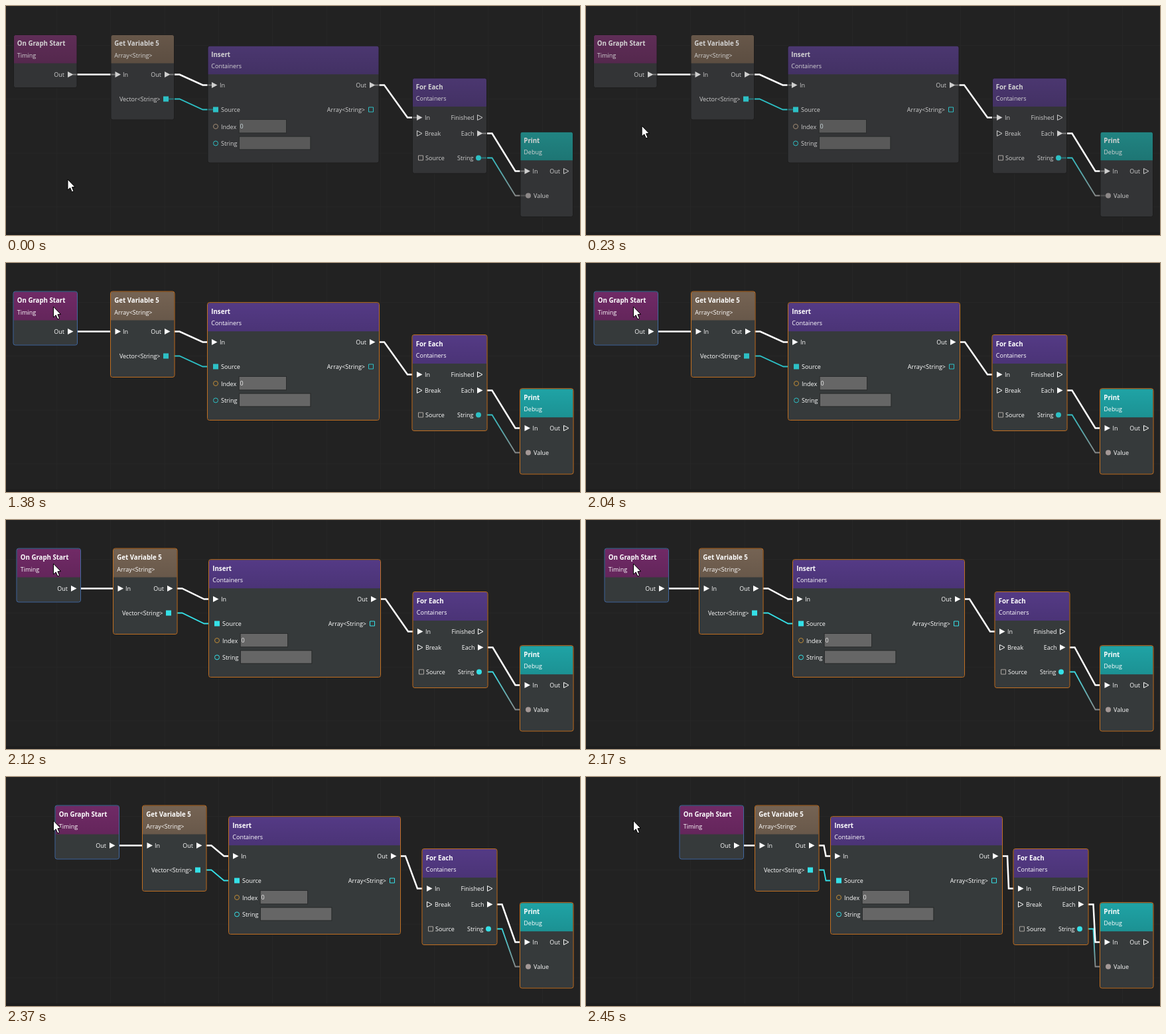
An HTML page with a canvas for the animation above (3.71 s loop, 865 px wide and 346 px high).

```html
<!DOCTYPE html>
<html lang="en">
<head>
<meta charset="utf-8">
<title>Node graph</title>
<style>
html, body { margin: 0; width: 100%; height: 100%; overflow: hidden; background: #222; }
canvas { display: block; }
</style>
</head>
<body>
<canvas id="stage" width="865" height="346"></canvas>
<script>
const ctx = document.getElementById('stage').getContext('2d');
const LOOP = 3710, HOVER_END = 430, SELECT_AT = 1380, DRAG_START = 2040;
const POINTER_STEPS = [0, 40, 90, 140, 190, 240, 280, 330, 380, 430];
const DRAG_STEPS = [0, 50, 90, 130, 180, 230, 280, 330, 360, 410];
const REGULAR = '9px "Open Sans", sans-serif';
const BOLD = 'bold 9.7px "Open Sans", sans-serif';
const GREY = '#8d8888';
const PURPLE = ['#4b3770', '#543a85'];

// Header colours are [dim, lit]; pull is the share of the drag each node follows.
// Ports: side, shape, x, y, label, label x, filled, [dim, lit] tint
const nodes = [
  { title: 'On Graph Start', sub: 'Timing', x: 11.5, y: 43.5, w: 95.5, h: 80, pull: 1,
    head: ['#5f2d57', '#702a66'], ports: [
      ['out', 'tri', 93, 103.5, 'Out', 88, true]] },
  { title: 'Get Variable 5', sub: 'Array<String>', x: 158, y: 43.5, w: 95.5, h: 128.5, pull: .75,
    head: ['#675749', '#756353'], ports: [
      ['in', 'tri', 164.5, 103.5, 'In', 176, true],
      ['out', 'tri', 239, 103.5, 'Out', 234, true],
      ['out', 'square', 237, 140.5, 'Vector<String>', 232.5, true]] },
  { title: 'Insert', sub: 'Containers', x: 304, y: 60.2, w: 258, h: 176.8, pull: .5,
    head: PURPLE, ports: [
      ['in', 'tri', 310, 119.5, 'In', 322, true],
      ['out', 'tri', 548, 119.5, 'Out', 543, true],
      ['in', 'square', 312, 156.5, 'Source', 324, true],
      ['out', 'square', 546, 156.5, 'Array<String>', 541, false],
      ['in', 'circle', 312, 182, 'Index', 324, false, ['#a58d74', '#c08c36']],
      ['in', 'circle', 312, 207.5, 'String', 324, false]],
    fields: [[351.5, 172, 70.5, 19.5, '0'], [352, 197.5, 106.5, 19, '']] },
  { title: 'For Each', sub: 'Containers', x: 612.5, y: 109, w: 112, h: 144, pull: .245,
    head: PURPLE, ports: [
      ['in', 'tri', 619, 168.5, 'In', 631, true],
      ['out', 'tri', 710, 168.5, 'Finished', 705.5, false],
      ['in', 'tri', 619, 192.5, 'Break', 631, false],
      ['out', 'tri', 710, 192.5, 'Each', 705.5, true],
      ['in', 'square', 621, 229.5, 'Source', 632, false, ['#aaa5a0', '#aaa5a0']],
      ['out', 'circle', 708, 229.5, 'String', 704.5, true]] },
  { title: 'Print', sub: 'Debug', x: 775, y: 190.2, w: 79.5, h: 128.3, pull: 0,
    head: ['#218482', '#1fa3a5'], ports: [
      ['in', 'tri', 781.5, 249.5, 'In', 793.5, true],
      ['out', 'tri', 840, 249.5, 'Out', 835, false],
      ['in', 'circle', 783, 286.5, 'Value', 795, true, [GREY, '#a39896']]] }
];

// from node, y, to node, y, kind
const wires = [
  [1, 140.5, 2, 156.5, 'data'], [3, 229.5, 4, 286.5, 'fade'],
  [0, 103.5, 1, 103.5, 'flow'], [1, 103.5, 2, 119.5, 'flow'],
  [2, 119.5, 3, 168.5, 'flow'], [3, 192.5, 4, 249.5, 'flow']
];

const held = (steps, t) => steps.filter(s => s <= t).pop();

function path(points, close) {
  ctx.beginPath();
  points.forEach(([x, y]) => ctx.lineTo(x, y));
  if (close) ctx.closePath();
}

function text(str, x, y, font, color, align = 'left') {
  ctx.font = font;
  ctx.fillStyle = color;
  ctx.textAlign = align;
  ctx.fillText(str, x, y);
}

// Circular ease-in whose clock runs a little faster at the start
function dragOffset(t) {
  if (t < DRAG_START) return 0;
  const s = held(DRAG_STEPS, t - DRAG_START);
  const p = s < 130 ? .159 + s * .0026 : .497 + (s - 130) * .001817;
  return 130 * (1 - Math.sqrt(1 - Math.min(p, 1) ** 2));
}

function pointerAt(t) {
  const p = held(POINTER_STEPS, t) / HOVER_END;
  const e = p * p * (3 - 2 * p);
  return [93 - 21.5 * e, 262 - 196 * e];
}

function drawGrid() {
  ctx.fillStyle = '#222222';
  ctx.fillRect(0, 0, 865, 346);
  ctx.fillStyle = '#262626';
  for (let x = 76; x < 865; x += 81.3) ctx.fillRect(Math.round(x), 0, 1, 346);
  for (let y = 59; y < 346; y += 81.3) ctx.fillRect(0, Math.round(y), 865, 1);
  ctx.fillStyle = '#1e1e1e';
  ctx.fillRect(0, 342, 865, 4);
}

function drawWire([from, y1, to, y2, kind], shift, teal) {
  const a = nodes[from], b = nodes[to];
  const x1 = a.x + a.w + shift(a), x2 = b.x + shift(b);
  if (kind === 'fade') {
    const g = ctx.createLinearGradient(x1, y1, x2, y2);
    g.addColorStop(0, teal);
    g.addColorStop(1, GREY);
    ctx.strokeStyle = g;
  } else ctx.strokeStyle = kind === 'flow' ? '#fff' : teal;
  ctx.lineWidth = kind === 'flow' ? 2.5 : 1.8;
  path(y1 === y2 ? [[x1, y1], [x2, y2]]
    : [[x1, y1], [x1 + 8, y1], [x2 - 7.5, y2], [x2, y2]]);
  ctx.stroke();
}

function drawPort([side, shape, x, y, label, labelX, filled, tint], node, lit, teal) {
  const ink = lit ? '#fff' : '#cfcfcf';
  const color = shape === 'tri' ? ink : tint ? tint[+lit] : teal;
  if (filled && !lit) {
    ctx.fillStyle = shape === 'tri' ? '#777' : color === GREY ? '#555' : '#287377';
    const [l, r] = side === 'in' ? [node.x, x] : [x + 8, node.x + node.w];
    ctx.fillRect(l, y - 1, r - l, 2);
  }
  ctx.fillStyle = ctx.strokeStyle = color;
  ctx.lineWidth = 1;
  const inset = filled ? 0 : .5;
  if (shape === 'tri') path([[x + inset, y - 4.5 + inset], [x + 8.5 - inset, y], [x + inset, y + 4.5 - inset]], true);
  else {
    ctx.beginPath();
    if (shape === 'square') ctx.rect(x + inset, y - 4 + inset, 8 - 2 * inset, 8 - 2 * inset);
    else ctx.arc(x + 4, y, 4 - inset, 0, 7);
  }
  filled ? ctx.fill() : ctx.stroke();
  text(label, labelX, y + 3.5, REGULAR, ink, side === 'in' ? 'left' : 'right');
}

function drawNode(node, shift, lit, border, teal) {
  const { x, y, w, h } = node;
  const ink = lit ? '#fff' : '#d4d4d4';
  ctx.save();
  ctx.translate(shift(node), 0);
  ctx.save();
  ctx.beginPath();
  ctx.roundRect(x, y, w, h, 3);
  ctx.fillStyle = lit ? '#363a3b' : '#333436';
  ctx.fill();
  ctx.clip();
  ctx.fillStyle = node.head[+lit];
  ctx.fillRect(x, y, w, 43);
  const shade = ctx.createLinearGradient(0, y, 0, y + 43);
  shade.addColorStop(0, '#00000000');
  shade.addColorStop(1, '#0000001c');
  ctx.fillStyle = shade;
  ctx.fillRect(x, y, w, 43);
  ctx.restore();

  text(node.title, x + 5.3, y + 16.5, BOLD, ink);
  text(node.sub, x + 5.3, y + 34, REGULAR, ink);
  node.ports.forEach(port => drawPort(port, node, lit, teal));
  for (const [fx, fy, fw, fh, value] of node.fields || []) {
    ctx.fillStyle = lit ? '#666666' : '#595959';
    ctx.fillRect(fx, fy, fw, fh);
    ctx.strokeStyle = '#2b2c2d';
    ctx.lineWidth = 1;
    ctx.strokeRect(fx - .5, fy - .5, fw + 1, fh + 1);
    text(value, fx + 1, fy + 13.3, REGULAR, lit ? '#f2f2f2' : '#cddbe0');
  }
  ctx.strokeStyle = border;
  ctx.lineWidth = 1;
  ctx.beginPath();
  const grow = lit ? .5 : 0;
  ctx.roundRect(x - grow, y - grow, w + 2 * grow, h + 2 * grow, 3);
  ctx.stroke();
  ctx.restore();
}

function drawPointer([x, y]) {
  path([[0, 0], [0, 16], [3.7, 12.8], [6.4, 19], [9, 17.8], [6.4, 11.8], [11, 11.5]]
    .map(([px, py]) => [x + px, y + py]), true);
  ctx.fillStyle = '#fff';
  ctx.fill();
  ctx.strokeStyle = '#000';
  ctx.lineWidth = 1;
  ctx.stroke();
}

function draw(t) {
  const offset = dragOffset(t);
  const shift = node => Math.floor(offset * node.pull + .2);
  const pointer = pointerAt(t);
  const hovered = pointer[1] < 124;
  const selected = t >= SELECT_AT;
  const teal = offset > 2 ? '#35e0e7' : '#2dc0c5';
  drawGrid();
  wires.forEach(wire => drawWire(wire, shift, teal));
  nodes.forEach((node, i) => {
    const lit = i ? selected : hovered;
    drawNode(node, shift, lit, !lit ? '#1d1d1d' : i ? '#c06f22' : '#42689f', teal);
  });
  drawPointer(pointer);
}

function frame() {
  draw(performance.now() % LOOP);
  requestAnimationFrame(frame);
}
frame();
</script>
</body>
</html>
```
